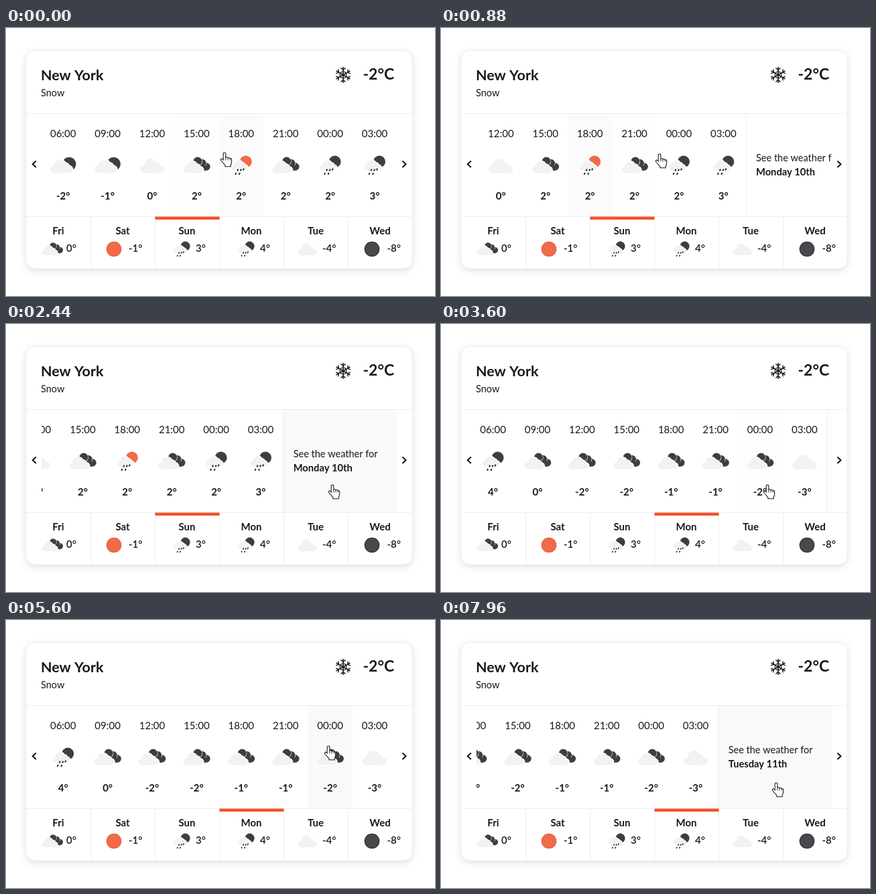
Write an HTML page with a canvas that moves like this. It is 640 by 400 pixels and loops after 8 s.

```html
<!DOCTYPE html>
<html lang="en">
<head>
<meta charset="utf-8">
<title>Weather card</title>
<style>
  html, body { margin: 0; width: 100%; height: 100%; overflow: hidden; background: #fff; }
  canvas { display: block; width: 640px; height: 400px; }
</style>
</head>
<body>
<canvas id="stage" width="640" height="400"></canvas>
<script>
const ctx = document.getElementById('stage').getContext('2d');
const LOOP = 8000, COL = 66.4, LIST_X = 52, SCROLL_MAX = 170, FADE = 300, SWITCH = 3400;
const INK = '#19191b', DARK = '#3d3e41', ORANGE = '#f16a49', ACCENT = '#f2552c', LINE = '#eeeeee', CLOUD = '#f2f2f1';

const HOURS = ['06:00', '09:00', '12:00', '15:00', '18:00', '21:00', '00:00', '03:00'];
const DAYS = {
  sun: {
    tab: 2, next: 'Monday 10th', temps: [-2, -1, 0, 2, 2, 2, 2, 3],
    icons: ['night', 'night', 'cloud', 'clouds', 'sunRain', 'clouds', 'rain', 'rain']
  },
  mon: {
    tab: 3, next: 'Tuesday 11th', temps: [4, 0, -2, -2, -1, -1, -2, -3],
    icons: ['rain', 'clouds', 'clouds', 'clouds', 'clouds', 'clouds', 'clouds', 'cloud']
  }
};
// name, icon, icon x, temperature, temperature x
const TABS = [
  ['Fri', 'clouds', 69, 0, 90], ['Sat', 'sunDisc', 161, -1, 183],
  ['Sun', 'rain', 262, 3, 283], ['Mon', 'rain', 358, 4, 379],
  ['Tue', 'cloud', 450, -4, 472], ['Wed', 'nightDisc', 546, -8, 568.5]
];
// start, end, from, to
const SCROLLS = [[440, 1095, 0, SCROLL_MAX], [3390, 3633, SCROLL_MAX, 0], [5900, 6215, 0, SCROLL_MAX]];
const MOVES = [
  [0, 160, [326, 186], [326, 188]],
  [1270, 2000, [326, 188], [487, 240]],
  [4900, 5580, [487, 240], [481, 188]],
  [6480, 7080, [481, 188], [500, 243]]
];
// column, enter, leave
const PANEL = 8;
const HOVERS = [
  [3, -900, -200], [4, -200, 780], [5, 780, 870], [6, 870, 1450], [7, 1450, 1660],
  [PANEL, 1660, SWITCH], [6, 3520, 6130], [PANEL, 6150, LOOP]
];

const clamp = v => Math.min(1, Math.max(0, v));
const ease = u => 0.5 - 0.5 * Math.cos(Math.PI * clamp(u));
const mix = (a, b, p) => a + (b - a) * p;

function scrollAt(t) {
  let pos = 0;
  for (const [a, b, from, to] of SCROLLS) if (t >= a) pos = mix(from, to, ease((t - a) / (b - a)));
  return pos;
}

function pointerAt(t) {
  let pos = MOVES[0][2];
  for (const [a, b, from, to] of MOVES) {
    const p = ease((t - a) / (b - a));
    if (t >= a) pos = [mix(from[0], to[0], p), mix(from[1], to[1], p)];
  }
  return pos;
}

const hoverAlpha = (t, enter, leave) =>
  clamp(clamp((Math.min(t, leave) - enter) / FADE) - Math.max(0, t - leave) / FADE);

function text(str, x, y, size = 15, weight = 400, align = 'left') {
  ctx.font = `${weight} ${size}px Lato, "Open Sans", sans-serif`;
  ctx.textAlign = align;
  ctx.fillStyle = INK;
  ctx.fillText(str, x, y);
}

function rect(x, y, w, h, color) {
  ctx.fillStyle = color;
  ctx.fillRect(x, y, w, h);
}

function disc(x, y, r, color) {
  ctx.fillStyle = color;
  ctx.beginPath();
  ctx.arc(x, y, r, 0, Math.PI * 2);
  ctx.fill();
}

function line(points, color, width) {
  ctx.strokeStyle = color;
  ctx.lineWidth = width;
  ctx.beginPath();
  points.forEach(([x, y]) => ctx.lineTo(x, y));
  ctx.stroke();
}

function cloud(x, y, scale, ring) {
  const puffs = (grow, color) => {
    for (const [px, py, r] of [[-12, 5.5, 6], [-2.5, -0.5, 9.5], [6, 2.5, 7], [12.5, 6, 5.5]])
      disc(x + px * scale, y + py * scale, r * scale + grow, color);
    rect(x - 12 * scale, y + 4 * scale, 24.5 * scale, 7.5 * scale + grow, color);
  };
  if (ring) puffs(ring, '#fff');
  puffs(0, CLOUD);
}

function rainy(color) {
  disc(7, -5.5, 9, color);
  cloud(-3, -0.5, 0.69, 1.6);
  for (const [x, y] of [[-5, 7], [-0.5, 7], [3.5, 6], [-8, 12.5], [-2.5, 12.5]])
    line([[x + 0.6, y - 1.4], [x - 0.6, y + 1.4]], INK, 1.8);
}

function ringed(fill, edge) {
  disc(0, 0, 14.3, edge);
  disc(0, 0, 13.3, fill);
}

const ICONS = {
  cloud: () => cloud(0, 0, 1),
  night() {
    disc(9, -2, 10.3, DARK);
    cloud(-3, 1, 0.9, 2);
  },
  clouds() {
    for (const [x, y, r] of [[14.5, 2, 5.8], [8, -3, 6.2], [1.5, -6, 6.5]]) {
      disc(x, y, r + 0.6, '#fff');
      disc(x, y, r, DARK);
    }
    rect(4, 0, 10, 7.8, DARK);
    cloud(-5, 2, 0.82, 1.4);
  },
  rain: () => rainy(DARK),
  sunRain: () => rainy(ORANGE),
  sunDisc: () => ringed(ORANGE, '#e65d3c'),
  nightDisc: () => ringed('#47484b', '#222224')
};

function icon(name, x, y, scale = 1) {
  ctx.save();
  ctx.translate(x, y);
  ctx.scale(scale, scale);
  ICONS[name]();
  ctx.restore();
}

function snowflake(x, y) {
  ctx.save();
  ctx.translate(x, y);
  for (let arm = 0; arm < 6; arm++) {
    line([[0, 0], [0, -12]], INK, 1.6);
    line([[-3.6, -10.6], [0, -7.4], [3.6, -10.6]], INK, 1.4);
    line([[-2.6, -4.5], [2.6, -4.5]], INK, 1.2);
    ctx.rotate(Math.PI / 3);
  }
  ctx.restore();
}

function card() {
  ctx.save();
  ctx.shadowColor = 'rgba(0,0,0,0.13)';
  ctx.shadowBlur = 12;
  ctx.shadowOffsetY = 3;
  ctx.fillStyle = '#fff';
  ctx.beginPath();
  ctx.roundRect(30, 33.5, 576, 325.5, 13);
  ctx.fill();
  ctx.restore();
  ctx.strokeStyle = '#f1f1f1';
  ctx.lineWidth = 1;
  ctx.stroke();
}

function header() {
  text('New York', 52, 78, 21.5, 700);
  text('Snow', 52, 102, 14.5);
  snowflake(503, 70);
  text('-2°C', 532.5, 77, 23, 700);
}

function hourly(t, day) {
  ctx.save();
  ctx.beginPath();
  ctx.rect(53, 128, 530, 153);
  ctx.clip();
  ctx.translate(LIST_X - scrollAt(t), 0);
  for (const [col, enter, leave] of HOVERS) {
    const width = col === PANEL ? SCROLL_MAX : COL;
    rect(col * COL, 128, width, 153, `rgba(0,0,0,${0.025 * hoverAlpha(t, enter, leave)})`);
  }
  HOURS.forEach((hour, i) => {
    const x = (i + 0.5) * COL;
    text(hour, x, 163, 15, 400, 'center');
    icon(day.icons[i], x, 205);
    text(day.temps[i] + '°', x, 256, 15, 700, 'center');
  });
  const panelX = PANEL * COL;
  rect(panelX, 128, 1, 153, LINE);
  text('See the weather for', panelX + 15.5, 198.5, 14.5);
  text(day.next, panelX + 15.5, 220, 14.7, 700);
  ctx.restore();
  line([[44.8, 198.5], [39.8, 203.2], [44.8, 207.9]], INK, 2.1);
  line([[591.4, 198.5], [596.4, 203.2], [591.4, 207.9]], INK, 2.1);
}

function tabs(active) {
  rect(30, 127, 576, 1, LINE);
  rect(30, 281, 576, 1, LINE);
  TABS.forEach(([name, kind, iconX, temp, tempX], i) => {
    if (i) rect(30 + 96 * i, 282, 1, 77, LINE);
    text(name, 78 + 96 * i, 308, 15, 700, 'center');
    icon(kind, iconX, 330, 0.79);
    text(temp + '°', tempX, 334, 15, 600);
  });
  rect(30.5 + 96 * active, 281.5, 96, 4.5, ACCENT);
}

const HAND = new Path2D('M-2 12V2Q-2 0 0 0Q2 0 2 2V8Q4 6.5 5.5 8.5Q8 7.5 9 9.5Q11.5 9 11.5 11.5V15' +
  'Q11.5 18 10 20V22.5H1V20.5Q-2 17 -6 12.5Q-6.5 9.5 -4 10Z');

function pointer([x, y]) {
  ctx.save();
  ctx.translate(x, y);
  ctx.scale(0.92, 0.92);
  ctx.fillStyle = '#fff';
  ctx.fill(HAND);
  ctx.strokeStyle = '#1a1a1a';
  ctx.lineWidth = 1.2;
  ctx.stroke(HAND);
  for (const knuckle of [2, 5.5, 9]) line([[knuckle, 8.5], [knuckle, 12.5]], '#1a1a1a', 1);
  ctx.restore();
}

function draw(now) {
  const t = now % LOOP;
  const day = t < SWITCH ? DAYS.sun : DAYS.mon;
  rect(0, 0, 640, 400, '#fff');
  card();
  header();
  hourly(t, day);
  tabs(day.tab);
  pointer(pointerAt(t));
}

let start;
function tick(now) {
  start ??= now;
  draw(now - start);
  requestAnimationFrame(tick);
}
requestAnimationFrame(tick);
</script>
</body>
</html>
```
